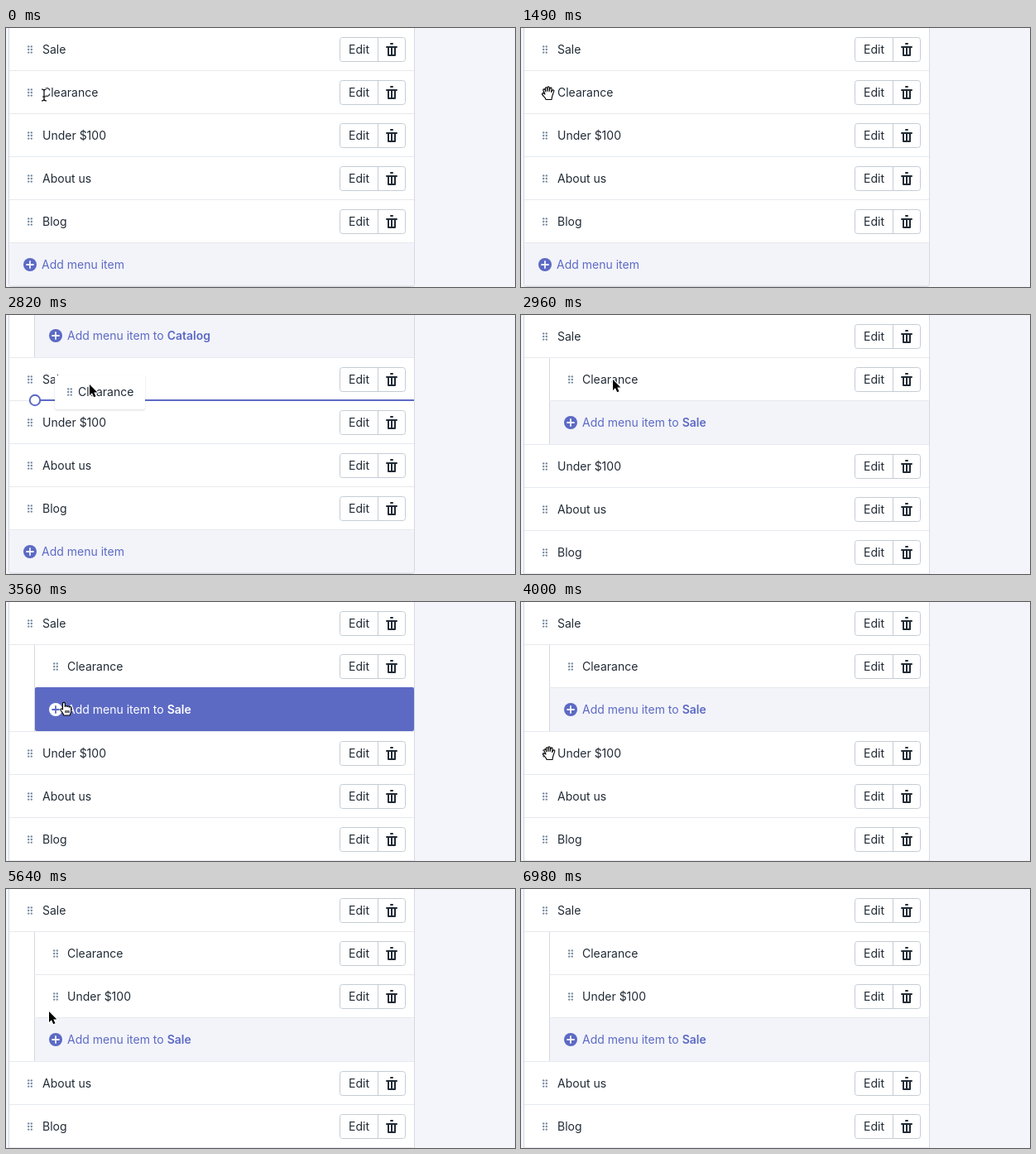
Recreate the animation shown at these times as an HTML page. Size 615 by 313 pixels, loop 7650 ms.

```html
<!DOCTYPE html>
<html lang="en">
<head>
<meta charset="utf-8">
<title>Reordering a menu</title>
<style>
  html, body { margin: 0; width: 100%; height: 100%; overflow: hidden; background: #f4f5fa; }
  svg { display: block; width: 100vw; height: 100vh; }
  text { font: 14px Inter, "Open Sans", sans-serif; fill: #212b36; white-space: pre; }
  .bold { font-weight: 600; }
  .lifted { filter: drop-shadow(0 1px 1px rgba(0, 0, 0, .14)); }
</style>
</head>
<body>
<svg id="stage" viewBox="0 0 615 313"></svg>
<script>
const LOOP = 7650, TICK = 148.3, LEAD = 12;
const INDIGO = '#5c6ac4', PALE = '#f3f4fa', RULE = '#e6e9ee', EDGE = '#d5d8e1';
const RIGHT = 493, ROW = 52;
const stage = document.getElementById('stage');

// Pointer moves: first tick, last tick, x, y, strength of the slow-down
const START = [46, 81];
const MOVES = [
  [1, 3, 33, 79, 1], [11, 17, 82, 95, .8], [18, 20, 111, 78, 1], [24, 29, 32, 185, 3.6],
  [31, 33, 53, 148, 1], [36, 38, 52, 148, 1], [41, 47, 535, 335, 3.6]
];

// ">" marks a nested row, "+" a row that adds an item
const SCENES = [
  { from: 0, rows: 'Sale|Clearance|Under $100|About us|Blog|+' },
  { from: 11, top: -1, rows: '>+Catalog|Sale|Under $100|About us|Blog|+',
    drag: { name: 'Clearance', width: 109, line: 103, release: 18 } },
  { from: 20, rows: 'Sale|>Clearance|>+Sale|Under $100|About us|Blog|+' },
  { from: 31, rows: 'Sale|>Clearance|>+Sale|About us|Blog|+',
    drag: { name: 'Under $100', width: 123, line: 156, release: 36 } },
  { from: 37, rows: 'Sale|>Clearance|>Under $100|>+Sale|About us|Blog|+' }
];

const HAND = 'fill="#fff" stroke="#000" stroke-width="1.1" stroke-linejoin="round"';
const CURSORS = {
  arrow: `<path d="M0 0V13L3 10.2 5.2 15.2 7.5 14.2 5.3 9.4H9.4Z" stroke="#fff" stroke-width="2" paint-order="stroke"/>`,
  beam: ['#fff" stroke-width="3', '#000" stroke-width="1.2'].map(ink =>
    `<path d="M-3-7Q0-7 0-5 0-7 3-7M0-5V5M-3 7Q0 7 0 5 0 7 3 7M-2 2H2" fill="none" stroke="${ink}"/>`).join(''),
  open: `<path ${HAND} d="M-4 1L-6-3.5C-6.6-5-4.6-5.8-4-4.4L-3-2-3.6-6C-3.8-7.6-1.7-7.8-1.5-6.2L-1-2.5V-7C-1-8.5
    1.2-8.5 1.2-7V-2.5L2-6C2.4-7.5 4.4-7 4.1-5.5L3.6-1.5 4.8-3.5C5.6-4.8 7.4-3.8 6.7-2.4L5 2.5C4.6 4.2 4 5.5 4 7.5H-3C-3.2
    5.5-5.5 3.8-7.4 1.4-8.2 0-6.5-1-4 1Z"/>`,
  fist: `<path ${HAND} d="M-4.5-1.5C-5.5-5-2.5-5.5-2-4-2-6-.2-6 .3-4.2 .8-6 2.8-5.5 2.8-3.8 3.5-5 5.5-4.5 5.3-2.5V1.5C5.3
    4 4 4.5 4 6.5H-3C-3.2 4.5-6 3-6 .5-6-1-5.2-1.6-4.5-1.5ZM-2-4V-2M.3-4.2V-2M2.8-3.8V-2"/>`,
  point: `<path ${HAND} d="M-4.5 0V-6.2A1.4 1.4 0 0 1-1.7-6.2V-2.5C-1.7-3.9 .9-3.9 .9-2.3 .9-3.7 3.4-3.5 3.4-1.8 3.4-3
    5.7-2.8 5.7-1.2V3C5.7 5.5 4.2 6 4.2 8H-3.2C-3.5 5.5-6 4-7 1.5-7.5 0-5.8-.8-4.5 1ZM-1 2V5M1 2V5M3 2V5"/>`
};

const rect = (x, y, w, h, fill, more = '') =>
  `<rect x="${x}" y="${y}" width="${w}" height="${h}" fill="${fill}" ${more}/>`;
const label = (x, y, body, more = '') => `<text x="${x}" y="${y + 5}" ${more}>${body}</text>`;
const at = (x, y, body) => `<g transform="translate(${x} ${y})">${body}</g>`;

const grip = [-1.8, 1.8].flatMap(x => [-3.6, 0, 3.6].map(y =>
  `<circle cx="${x}" cy="${y}" r="1.2" fill="#768aa0"/>`)).join('');

const trash = `<path d="M-1-7H1M-6-3H6M-4-3V7H4V-3M0-3V7" fill="none" stroke="#212b36"
  stroke-width="2" stroke-linecap="round" stroke-linejoin="round"/>`;

const buttons = rect(403.5, -14.5, 79, 29, '#fff', 'rx="3" stroke="#c4cdd5"') +
  rect(449, -14, 1, 28, '#c4cdd5') + label(414, 0, 'Edit') + at(466, 0, trash);

const plus = (disc, cross) => `<circle r="8" fill="${disc}"/>
  <path d="M-4 0H4M0-4V4" stroke="${cross}" stroke-width="1.8" stroke-linecap="round"/>`;

function layout({ rows, top = 0 }) {
  return rows.split('|').map(code => {
    const [, nest, add, name] = code.match(/^(>?)(\+?)(.*)$/);
    const row = { nested: !!nest, adds: !!add, name, top, height: nest && add ? ROW + 1 : ROW };
    top += row.height;
    return row;
  });
}

function addRow({ nested, name, top, height }, hover) {
  const left = nested ? 35 : 4, mid = top + 26, lift = hover ? 1 : 0;
  const ink = hover ? '#fff' : INDIGO, back = hover ? INDIGO : PALE;
  const tail = name && ` to <tspan class="bold">${name}</tspan>`;
  return rect(left, top - lift, RIGHT - left, height - 1 + lift, back, 'rx="2"') +
    at(nested ? 60 : 29, mid, plus(ink, back)) +
    label(nested ? 74 : 43, mid, 'Add menu item' + tail, `style="fill:${ink}"`);
}

function itemRow({ nested, name, top }) {
  const mid = top + 26;
  return at(nested ? 60 : 29, mid, grip) + label(nested ? 74 : 44, mid, name) + at(0, mid, buttons);
}

function card(rows, hovered) {
  const bottom = rows.at(-1).top + ROW;
  const frame = (fill, stroke) => rect(3.5, -9.5, 490, bottom + 10, fill, `rx="3" stroke="${stroke}"`);
  const body = rows.map(row => {
    const { nested, adds, top, height } = row, left = nested && !adds ? 34 : 4;
    return (nested ? rect(34, top, 1, height, EDGE) : '') +
      rect(left, top + height - 1, RIGHT - left, 1, RULE) +
      (adds ? addRow(row, row === hovered) : itemRow(row));
  });
  return frame('#fff', 'none') + body.join('') + frame('none', EDGE);
}

function pointer(tick) {
  let [x, y] = START;
  for (const [from, to, endX, endY, power] of MOVES) {
    const k = Math.min(1, Math.max(0, (tick - from + 1) / (to - from + 1)));
    const eased = 1 - (1 - k) ** power;
    x += (endX - x) * eased;
    y += (endY - y) * eased;
  }
  return [Math.round(x), Math.round(y)];
}

// The item follows the pointer until it is released; the drop line indents as it moves right
function dragged({ name, width, line, release }, tick) {
  const [x, y] = pointer(Math.min(tick, release - 1)), gripX = x - 5, gripY = y - 2;
  const start = gripX > 45 ? 35 : 5;
  return rect(start + 6, line - 1, RIGHT - 6 - start, 2, INDIGO) +
    `<circle cx="${start}" cy="${line}" r="6.2" fill="#fff" stroke="${INDIGO}" stroke-width="2"/>` +
    at(gripX, gripY, rect(-18, -20, width, 41, '#fff', 'rx="2" class="lifted"') +
      grip + label(10, 0, name));
}

function draw(tick) {
  const scene = SCENES.findLast(s => s.from <= tick), { drag } = scene;
  const rows = layout(scene), [x, y] = pointer(tick);
  const hovered = !drag && x > 35 && x < RIGHT &&
    rows.find(r => r.nested && r.adds && y >= r.top && y < r.top + r.height);
  const shape = drag ? (tick < drag.release ? 'fist' : 'arrow')
    : hovered ? 'point' : x < 38 ? 'open' : tick < 3 ? 'beam' : 'arrow';
  stage.innerHTML = card(rows, hovered) + (drag ? dragged(drag, tick) : '') + at(x, y, CURSORS[shape]);
}

let last = -1;
function run() {
  const tick = Math.floor((performance.now() % LOOP + LEAD) / TICK);
  if (tick !== last) draw(last = tick);
  requestAnimationFrame(run);
}
run();
</script>
</body>
</html>
```
